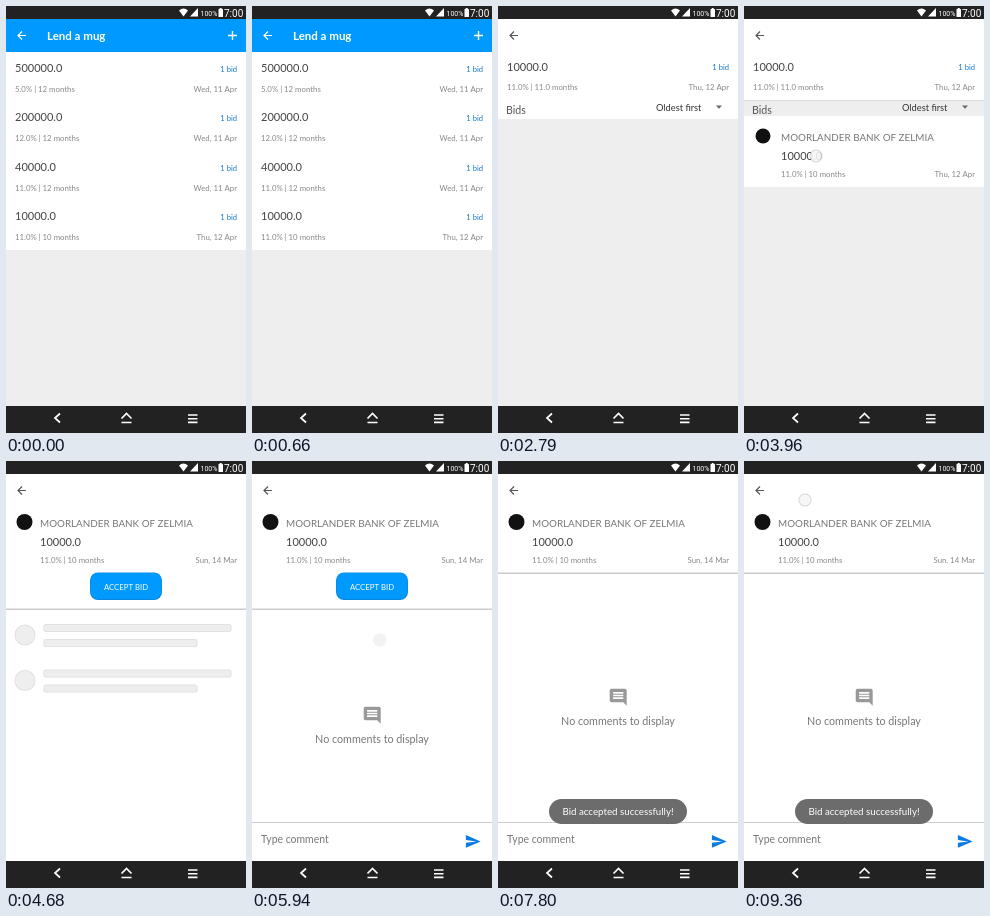
Recreate the animation shown at these times as an HTML page with a canvas. Size 240 by 427 pixels, loop 9.39 s.

```html
<!DOCTYPE html>
<html lang="en">
<head>
<meta charset="utf-8">
<style>
  html, body { margin: 0; height: 100%; overflow: hidden; }
  canvas { display: block; width: 240px; height: 427px; }
</style>
</head>
<body>
<canvas></canvas>
<script>
const W = 240, H = 427, LOOP = 9390;
const BLUE = '#0099ff', PALE = '#eeeeee';
const BANK = 'MOORLANDER BANK OF ZELMIA';
const canvas = document.querySelector('canvas');
const g = canvas.getContext('2d');
const ratio = window.devicePixelRatio || 1;
canvas.width = W * ratio;
canvas.height = H * ratio;

const progress = (t, start, length) => Math.min(1, Math.max(0, (t - start) / length));
const smooth = p => p * p * (3 - 2 * p);
const mix = (a, b, p) => a + (b - a) * p;

function text(str, x, y, size, color, align = 'left', weight = 400, family = 'Lato') {
  g.font = `${weight} ${size}px ${family}, sans-serif`;
  g.textAlign = align;
  g.fillStyle = color;
  g.fillText(str, x, y);
}

function rect(x, y, w, h, color, radius = 0) {
  g.fillStyle = color;
  g.beginPath();
  g.roundRect(x, y, w, h, radius);
  g.fill();
}

function circle(x, y, r, color) {
  g.fillStyle = color;
  g.beginPath();
  g.arc(x, y, r, 0, 7);
  g.fill();
}

function stroke(d, color, width) {
  g.strokeStyle = color;
  g.lineWidth = width;
  g.stroke(new Path2D(d));
}

function fill(d, color) {
  g.fillStyle = color;
  g.fill(new Path2D(d), 'evenodd');
}

// Draws a group shifted, scaled and faded.
function group(alpha, x, y, draw, scale = 1) {
  if (alpha <= 0) return;
  g.save();
  g.globalAlpha *= alpha;
  g.translate(x, y);
  g.scale(scale, scale);
  draw();
  g.restore();
}

const backArrow = color => stroke('M20 29.5H12M16 25.5L12 29.5L16 33.5', color, 1.2);

function details(x, y, amount, terms, date, gap = 20) {
  text(amount, x, y, 11, '#444');
  text(terms, x, y + gap, 7.8, '#888');
  text(date, 231, y + gap, 7.8, '#888', 'right');
}

function listPage() {
  rect(0, 13, W, H, PALE);
  rect(0, 46, W, 198, '#fff');
  rect(0, 13, W, 33, BLUE);
  backArrow('#fff');
  text('Lend a mug', 41, 33.5, 11.5, '#fff', 'left', 700);
  stroke('M222 29.5H231M226.5 25V34', '#fff', 1.4);
  const rows = [
    ['500000.0', '5.0% | 12 months', 'Wed, 11 Apr'],
    ['200000.0', '12.0% | 12 months', 'Wed, 11 Apr'],
    ['40000.0', '11.0% | 12 months', 'Wed, 11 Apr'],
    ['10000.0', '11.0% | 10 months', 'Thu, 12 Apr']
  ];
  rows.forEach((row, i) => {
    const y = 66 + i * 49.4;
    details(9, y, ...row);
    text('1 bid', 231, y, 7.6, '#1478c8', 'right');
  });
}

function bidsPage(t) {
  const loaded = progress(t, 2900, 250);
  rect(0, 13, W, H, PALE);
  rect(0, 13, W, 100, '#fff');
  backArrow('#555');
  details(9, 65, '10000.0', '11.0% | 11.0 months', 'Thu, 12 Apr', 19);
  text('1 bid', 231, 64, 7.6, '#1478c8', 'right');
  group(loaded, 0, 0, () => {
    rect(0, 94, W, 16, PALE);
    rect(0, 94, W, 1, '#ddd');
    rect(0, 110, W, 71, '#fff');
    circle(19, 130, 7.5, '#111');
    text(BANK, 37, 134.5, 9.85, '#777');
    details(37, 154, '10000.0', '11.0% | 10 months', 'Thu, 12 Apr', 17);
  });
  text('Bids', 8, 107.5, 10.6, '#555');
  text('Oldest first', 158, 104.5, 9.3, '#333');
  fill('M218 99.5H224L221 102.8Z', '#666');
}

function skeleton() {
  for (const y of [163, 208.5]) {
    circle(19, y + 11, 10.5, '#ddd');
    circle(19, y + 11, 9.7, PALE);
    for (const [dy, w] of [[0, 188], [15, 154]]) {
      rect(37.5, y + dy, w, 8, '#ddd', 2.5);
      rect(38.2, y + dy + .7, w - 1.4, 6.6, PALE, 2);
    }
  }
}

function comments(shift) {
  group(1, 110, 226 + shift, () =>
    fill('M2 4Q2 2 4 2H20Q22 2 22 4V22L18 18H4Q2 18 2 16ZM6 6V8H18V6ZM6 9V11H18V9ZM6 12V14H18V12Z', '#999'), .85);
  text('No comments to display', 120, 264 + shift, 10.75, '#777', 'center');
  rect(0, 361, W, 1, '#ccc');
  text('Type comment', 9, 381.5, 10.45, '#777');
  group(1, 212.5, 372, () => fill('M2 21L23 12L2 3V10L17 12L2 14Z', '#0a7be0'), .7);
}

function bidPage(t) {
  const collapse = smooth(progress(t, 6970, 120));
  const loaded = progress(t, 5050, 200);
  const shift = 18 * (1 - collapse);
  rect(0, 13, W, H, '#fff');
  backArrow('#555');
  circle(18.5, 61, 8, '#111');
  text(BANK, 34, 65.5, 9.85, '#777');
  details(34, 85, '10000.0', '11.0% | 10 months', 'Sun, 14 Mar', 17);
  group(1 - collapse, 0, 0, () => {
    rect(84, 111.5, 72, 27.5, '#0a86e0', 8);
    rect(84.7, 112, 70.6, 26, BLUE, 7.5);
    const press = progress(t, 6500, 300);
    group(.25 * Math.sin(Math.PI * press), 0, 0, () => circle(112, 123, 12 * press, '#fff'));
    text('ACCEPT BID', 120, 128.5, 7.75, '#fff', 'center');
  });
  rect(0, 111.5 + 2 * shift, W, 1.5, '#ccc');
  group(1 - loaded, 0, 0, skeleton);
  group(loaded, 0, 0, () => comments(shift));
  group(progress(t, 7050, 300), 0, 0, () => {
    rect(51, 338, 138, 25, '#6c6c6c', 12.5);
    text('Bid accepted successfully!', 120, 354, 9.75, '#fff', 'center');
  });
}

function systemBars() {
  rect(0, 0, W, 13, '#222');
  fill('M173 4.5Q177.5 0.5 182 4.5L177.5 10.5Z', '#fff');
  fill('M192 2V10.5H184Z', '#fff');
  text('100%', 194.5, 9.5, 7, '#fff', 'left', 400, 'Roboto');
  rect(212.5, 3, 4.5, 8, '#fff', .5);
  rect(213.7, 2, 2, 1, '#fff');
  text('7:00', 218, 10.5, 10, '#fff', 'left', 400, 'Roboto');
  rect(0, 400, W, 27, '#222');
  stroke('M54 407.5L49 412L54 416.5M115.5 412.5L120.5 407.5L125.5 412.5M115.5 416.5H125.5', '#fff', 1.7);
  stroke('M182 409H191.5M182 412.7H191.5M182 416.4H191.5', '#fff', 1.6);
}

// Each pointer path is a list of [time, x, y].
const pointerPaths = [
  [[1500, 120, 238], [1850, 88, 214], [2080, 88, 214]],
  [[3600, 96, 172], [3930, 72, 150], [4180, 72, 150]],
  [[5900, 128, 180], [6400, 112, 124], [6800, 112, 123]],
  [[8000, 70, 78], [8600, 30, 45], [8940, 49, 41], [9340, 61, 39], [9600, 61, 39]]
];

function pointer(t) {
  for (const path of pointerPaths) {
    const start = path[0][0], end = path.at(-1)[0];
    if (t < start || t > end) continue;
    const i = path.findIndex(point => point[0] >= t) || 1;
    const [a, b] = [path[i - 1], path[i]];
    const p = smooth(progress(t, a[0], b[0] - a[0]));
    const alpha = progress(t, start, 120) * (1 - progress(t, end - 120, 120));
    group(alpha, mix(a[1], b[1], p), mix(a[2], b[2], p), () => {
      circle(0, 0, 6.5, 'rgba(150,150,150,.45)');
      circle(0, 0, 5.7, 'rgba(255,255,255,.8)');
    });
  }
}

function openPage(t, start, page) {
  group(progress(t, start, 200), 0, 34 * (1 - progress(t, start, 380)), () => page(t));
}

function frame(now) {
  const t = now % LOOP;
  g.setTransform(ratio, 0, 0, ratio, 0, 0);
  if (t < 2500) listPage();
  if (t < 4600) openPage(t, 2110, bidsPage);
  openPage(t, 4200, bidPage);
  pointer(t);
  systemBars();
  requestAnimationFrame(frame);
}
requestAnimationFrame(frame);
</script>
</body>
</html>
```
